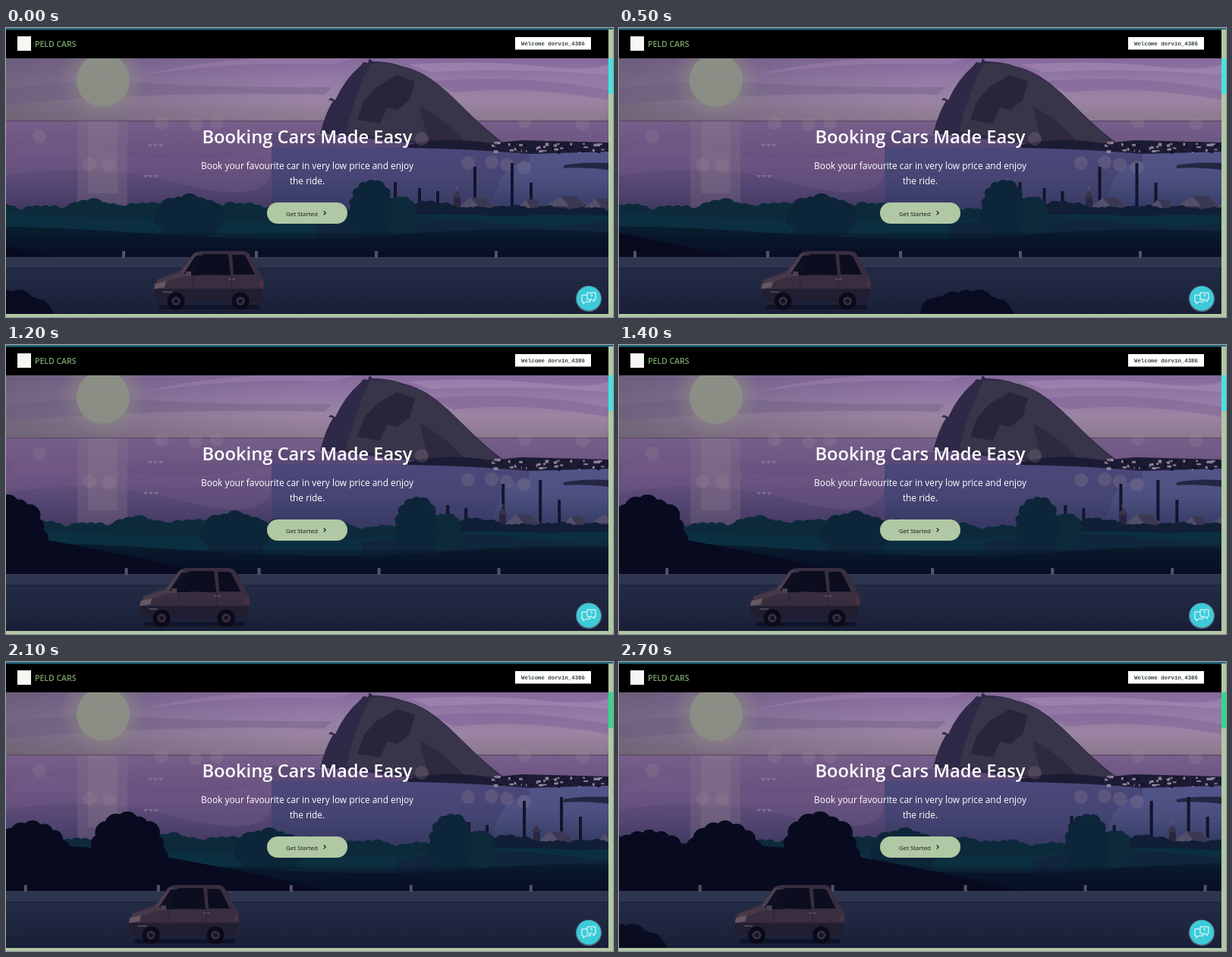
An HTML page with a canvas that plays this animation: 800 by 381 pixels, repeating every 2800 ms.

```html
<!DOCTYPE html>
<html lang="en">
<head>
<meta charset="utf-8">
<title>Booking Cars</title>
<style>
  html, body { margin: 0; width: 100%; height: 100%; overflow: hidden; background: #000; }
  canvas, svg { position: absolute; left: 0; top: 0; width: 800px; height: 381px; display: block; }
  .ui { font-family: "Open Sans", "Noto Sans", sans-serif; }
  .mono { font-family: "Liberation Mono", monospace; font-weight: 700; }
</style>
</head>
<body>
<canvas id="scene" width="800" height="381"></canvas>
<svg class="ui" viewBox="0 0 800 381">
  <rect width="800" height="40"/>
  <rect width="800" height="2.5" fill="#23687a"/>
  <rect x="15" y="11" width="18" height="19" fill="#f4f7f2"/>
  <text x="38" y="24.5" font-size="10.5" font-weight="600" fill="#7ba56d">PELD CARS</text>
  <rect x="671" y="12" width="100" height="16.5" fill="#fff"/>
  <text class="mono" x="679" y="23" font-size="7.37" fill="#34453a">Welcome dorvin_4386</text>

  <g fill="#fff" text-anchor="middle">
    <text x="397" y="152" font-size="23.7" font-weight="600">Booking Cars Made Easy</text>
    <text x="397" y="186" font-size="11.9">Book your favourite car in very low price and enjoy</text>
    <text x="397" y="206" font-size="11.9">the ride.</text>
  </g>
  <rect x="344" y="230" width="106" height="28" rx="14" fill="#b0c8a3"/>
  <text x="369" y="247.5" font-size="7.9" fill="#10180f">Get Started</text>
  <path d="M418.7 241.3l2.5 2.5-2.5 2.5" fill="none" stroke="#10180f" stroke-width="1.2"/>

  <rect y="377" width="800" height="4" fill="#b0c8a3"/>
  <rect x="794" y="2" width="6" height="379" fill="#b0c8a3"/>
  <rect id="thumb" x="794" y="40" width="6" height="47"/>
  <circle cx="768" cy="357" r="17.2" fill="#b9edf0" opacity=".35"/>
  <circle cx="768" cy="356.5" r="16" fill="#3dcbd9"/>
  <g fill="#3dcbd9" stroke="#fff" stroke-linejoin="round">
    <path d="M759 352h11v9h-6l-3 3v-3h-2z"/>
    <path d="M766 349h11v9h-2v3l-3-3h-6z"/>
    <path d="M770 352q1.500-1.500 2.500 0q0 1-1 2m0 1.200v.5" fill="none"/>
  </g>
</svg>
<script>
const ctx = document.getElementById('scene').getContext('2d');
const thumb = document.getElementById('thumb');
const LOOP = 2800, STEP = 100;

// Horizontal speed of each layer, in pixels per millisecond.
const SPEED = { chimneys: 0.031, hills: 0.05, trees: 0.175, posts: 0.398, foreground: 0.915, car: -0.0157 };

function random(seed) {
  return () => {
    seed = (seed * 16807) % 2147483647;
    return seed / 2147483647;
  };
}

function rect(x, y, w, h, fill) {
  ctx.fillStyle = fill;
  ctx.fillRect(x, y, w, h);
}

function shape(path, fill) {
  ctx.fillStyle = fill;
  ctx.fill(new Path2D(path));
}

function disc(x, y, r, fill) {
  ctx.fillStyle = fill;
  ctx.beginPath();
  ctx.arc(x, y, r, 0, 7);
  ctx.fill();
}

function blend(g, colors) {
  colors.forEach((c, i) => g.addColorStop(i / (colors.length - 1), c));
  return g;
}

const down = (y0, y1, ...colors) => blend(ctx.createLinearGradient(0, y0, 0, y1), colors);
const across = (x0, x1, ...colors) => blend(ctx.createLinearGradient(x0, 0, x1, 0), colors);

function shifted(dx, draw) {
  ctx.save();
  ctx.translate(dx, 0);
  draw();
  ctx.restore();
}

// A dome of foliage with a bumpy edge.
function bush(x, top, w, bottom, fill) {
  const rnd = random(Math.round(Math.abs(w * 97 + top * 13)) + 1);
  const r = w * 0.13, rx = w / 2 - r, ry = (bottom - top) * 0.62;
  const cy = top + ry;
  ctx.fillStyle = fill;
  ctx.beginPath();
  ctx.ellipse(x, cy, rx + r * 0.5, ry - r * 0.5, 0, 0, 7);
  ctx.rect(x - rx, cy, rx * 2, bottom - cy);
  for (let i = 0; i <= 8; i++) {
    const a = Math.PI * (1 + i / 8), size = r * (0.8 + rnd() * 0.35);
    const bx = x + Math.cos(a) * rx, by = cy + Math.sin(a) * (ry - r);
    ctx.moveTo(bx + size, by);
    ctx.arc(bx, by, size, 0, 7);
  }
  ctx.fill();
}

function hedge(from, to, gap, top, bottom, fill) {
  const rnd = random(from + 4000);
  for (let x = from; x < to; x += gap)
    bush(x, top + rnd() * 12, gap * (1.1 + rnd() * 0.4), bottom, fill);
}

function sky() {
  rect(0, 40, 794, 83, down(40, 122, '#84699a', '#9379a6', '#9b84a3', '#8c788e'));
  rect(0, 40, 400, 83, across(0, 400, 'rgba(86,82,96,.55)', 'rgba(104,88,122,0)'));
  shape('M0 80Q90 67 190 73T430 78L420 88Q210 82 0 101Z', 'rgba(102,88,124,.35)');
  shape('M180 62Q300 43 430 48L460 40H330Q250 45 180 62Z', 'rgba(166,134,180,.4)');
  shape('M530 48Q630 42 700 50T794 48V62Q680 52 560 58Z', 'rgba(172,142,186,.5)');
  shape('M560 70Q680 60 794 82V95Q690 75 590 85Z', 'rgba(114,84,142,.35)');
  const glow = ctx.createRadialGradient(128, 66, 30, 128, 66, 58);
  rect(60, 40, 140, 83, blend(glow, ['rgba(143,142,132,.5)', 'rgba(143,142,132,0)']));
  disc(128, 69, 35, down(40, 104, '#8b8f86', '#8b8c84'));
}

function sea() {
  rect(0, 122, 794, 150, down(122, 260, '#775f8a', '#68527f', '#514470', '#343155'));
  rect(0, 122, 794, 1.3, '#5b4967');
  shape('M0 195Q120 175 230 205T350 190V160Q220 185 120 160T0 172Z', 'rgba(128,98,145,.25)');
  rect(94, 123, 66, 115, 'rgba(139,119,137,.28)');
  rect(108, 123, 39, 95, 'rgba(148,131,141,.23)');
  rect(350, 157, 444, 90, down(157, 240, '#54558a', '#4c507f', '#343b65'));
  shape('M350 137L540 150Q620 165 690 162V176Q650 177 640 238H350Z', 'rgba(60,54,98,.4)');
  for (const x of [181, 188, 195]) {
    shape(`M${x + 6} 153h6l-3 4z`, 'rgba(153,132,163,.6)');
    shape(`M${x} 194h6l-3 4z`, 'rgba(153,132,163,.6)');
  }
}

function rock() {
  shape('M414 139Q421 112 431 96L425 95L428 92L434 95Q446 68 467 50L471 45L477 46L479 40L483 44Q506 44 524 51C553 57 576 78 602 104Q634 136 658 153L570 156Z', '#2e2946');
  shape('M448 137Q461 85 480 47Q506 45 524 52C553 58 576 79 602 105Q632 135 652 151L548 151Z', '#383449');
  shape('M488 78L515 62L539 70L532 95L516 108L502 105L493 126L463 121L472 96Z', '#29243b');
  shape('M545 103Q580 121 605 151H557Z', 'rgba(37,31,55,.5)');
  shape('M530 154Q580 142 638 152L680 148L794 151V163L690 166Q610 159 530 158Z', '#1c1b34');
  shape('M735 181Q760 176 794 178V187Q760 183 735 185Z', '#242643');
  const rnd = random(71);
  for (let i = 0; i < 60; i++) {
    const x = 640 + rnd() * 148, y = 149 + rnd() * 13;
    rect(x, y, 2 + rnd() * 4, 1.5 + rnd() * 3, rnd() > 0.5 ? '#938099' : '#151529');
  }
}

function bokeh() {
  const lights = [[44, 143], [205, 125], [250, 127], [278, 125], [110, 180], [136, 181],
    [548, 146], [609, 178], [640, 177], [660, 180], [684, 124], [683, 184], [760, 126]];
  for (const [x, y] of lights) disc(x, y, 9, 'rgba(157,138,150,.24)');
}

function chimneys() {
  const stacks = [[513, 203], [545, 211], [569, 215], [618, 183], [667, 178], [692, 204]];
  for (const [x, top] of stacks) rect(x - 2, top, 4, 250 - top, '#11142d');
}

function house(x, y, w) {
  rect(x, y + 11, w, 22, '#383654');
  shape(`M${x - 4} ${y + 13}L${x + w * 0.3} ${y}H${x + w * 0.75}L${x + w + 4} ${y + 13}Z`, '#534e69');
  shape(`M${x + w * 0.3} ${y}L${x + w * 0.6} ${y + 15}H${x + w + 4}L${x + w * 0.75} ${y}Z`, '#3b3854');
  rect(x + w * 0.2, y + 17, 4, 5, '#6a6079');
  rect(x + w * 0.65, y + 18, 5, 4, '#15172e');
}

function hills() {
  for (const [x, w] of [[600, 42], [676, 30], [715, 50], [766, 35]]) house(x, 232 - w * 0.2, w);
  rect(590, 222, 9, 25, '#292640');
  shape('M588 224l6.500-10 6.500 10z', '#39334c');
  rect(593.5, 209, 1, 6, '#5f5168');
  rect(591.5, 211, 5, 1, '#5f5168');
  hedge(560, 850, 52, 228, 258, '#101f35');
  hedge(-140, 470, 64, 225, 268, '#0d2a3b');
  shape('M-180 247Q-80 238 30 246T230 252Q360 260 460 251T650 248Q750 244 820 249V302H-180Z', '#0b2f40');
  shape('M410 260Q520 241 625 255T820 250V302H410Z', '#10263c');
  bush(242, 219, 98, 272, '#0c2538');
  bush(520, 221, 44, 266, '#0d2a3b');
  bush(481, 199, 64, 272, '#0c2538');
  shape('M-180 268Q-30 255 160 269T480 276Q650 258 820 271V303H-180Z', '#091c2e');
}

function nearTrees() {
  const dark = '#080b20';
  for (const [x, top, w] of [[-165, 214, 105], [-65, 218, 110], [35, 208, 108], [160, 198, 106]])
    bush(x, top, w, 292, dark);
  shape('M-230 247Q60 230 200 255T430 303H-230Z', dark);
}

function road(t) {
  rect(0, 302, 794, 75, down(302, 377, '#252d46', '#202841', '#191e36'));
  rect(0, 302, 794, 15, '#2e354f');
  rect(0, 302, 794, 1, '#3a3e57');
  rect(0, 316, 794, 1.5, '#1d2540');
  const gap = 158, wideGap = 175;
  const first = 330 + (gap + t * SPEED.posts) % gap;
  const post = x => rect(x - 2, 294, 4, 9, '#565068');
  for (let x = first; x < 800; x += gap) post(x);
  post(first - wideGap);
  post(first - wideGap * 2);
}

function wheel(x) {
  disc(x, 360, 11.5, '#0b0a19');
  disc(x, 360, 5.8, '#383041');
  disc(x, 360, 3, '#171528');
}

function car() {
  rect(202, 365, 132, 6, 'rgba(9,10,27,.55)');
  shape('M195 338L202 330L232 318L246 298Q250 294 260 294H313Q319 294 322 300L336 325Q341 329 340 347L337 359H202L194 353Z', '#382e40');
  shape('M195 344H340L337 361H202L194 353Z', '#221e32');
  shape('M229 322L247 299Q249 297 253 297L241 326Z', '#4c4050');
  shape('M234 324L250 300H264L259 326H232Z', '#0f0f22');
  shape('M248 325L257 301Q259 298 264 298H293L296 326Z', '#0c0d1f');
  shape('M298 299H311Q315 299 317 303L328 325H300Z', '#0c0d1f');
  shape('M199 332L231 322L241 326L225 330L200 339Z', '#463a4a');
  shape('M197 337L211 334L209 342L195 344Z', '#655863');
  rect(207, 347, 12, 2, '#4e4452');
  rect(293, 330, 9, 2, '#584b56');
  rect(237, 321, 7, 6, '#4d4150');
  rect(334, 333, 5, 8, '#4f3040');
  ctx.strokeStyle = '#282235';
  ctx.lineWidth = 1;
  ctx.stroke(new Path2D('M247 326L246 354M297 325L297 353M213 344L337 344'));
  wheel(224);
  wheel(309);
}

function draw(t) {
  ctx.clearRect(0, 0, 800, 381);
  sky();
  sea();
  rock();
  bokeh();
  shifted(t * SPEED.chimneys, chimneys);
  shifted(t * SPEED.hills, hills);
  rect(0, 270, 794, 34, down(268, 303, 'rgba(7,13,32,.2)', '#080e24'));
  shifted((t - 2100) * SPEED.trees, nearTrees);
  road(t);
  shifted(t * SPEED.car, car);
  bush(t * SPEED.foreground % 2470, 346, 125, 400, '#0a0d22');
  thumb.setAttribute('fill', t < 1900 ? '#42e5e0' : '#35d68c');
}

function tick(now) {
  draw(Math.floor((now % LOOP) / STEP) * STEP);
  requestAnimationFrame(tick);
}
draw(0);
requestAnimationFrame(tick);
</script>
</body>
</html>
```
